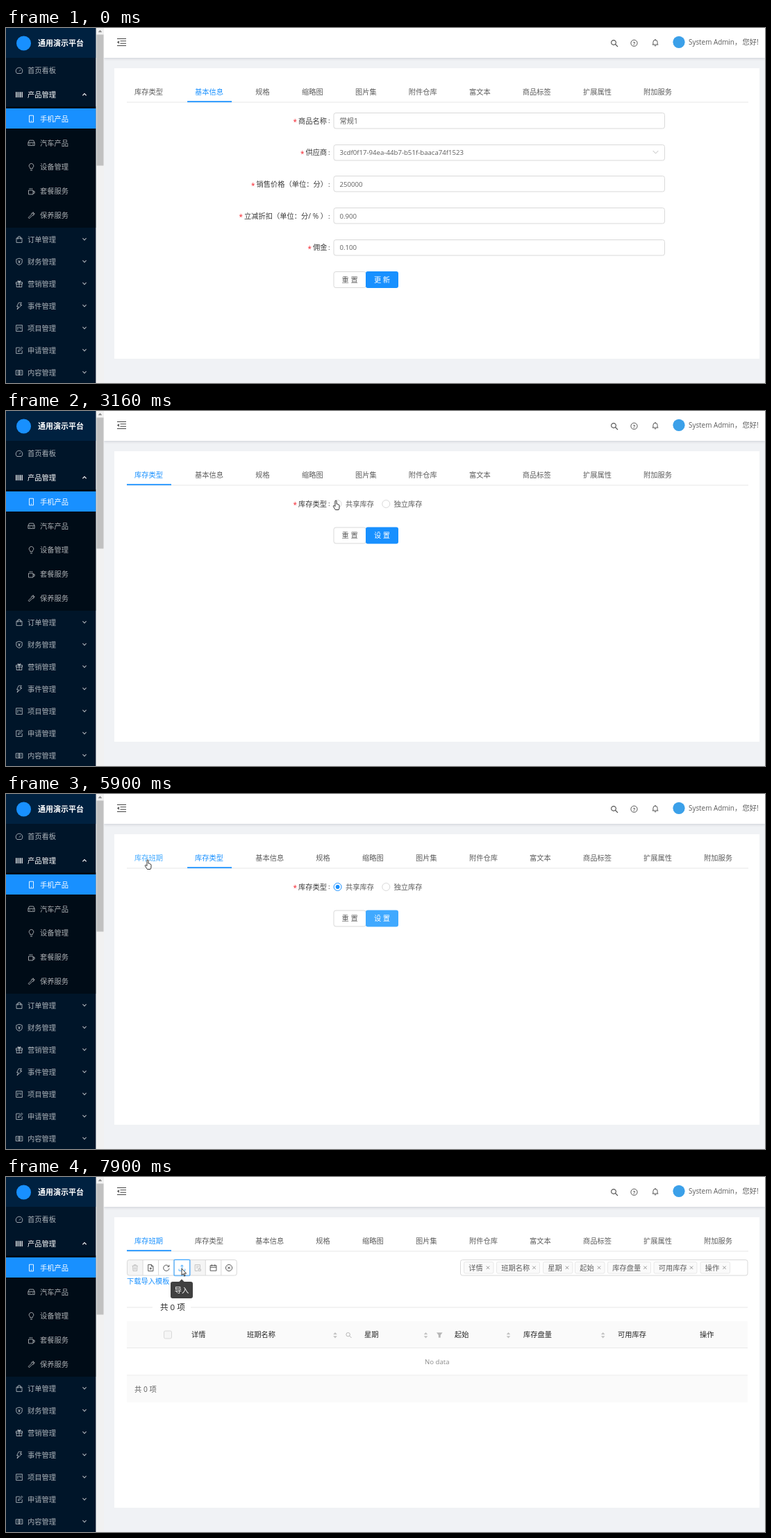
An HTML page with a canvas for the animation above (7.99 s loop, 1093 by 512 pixels).

```html
<!DOCTYPE html>
<html lang="zh-CN">
<head>
<meta charset="utf-8">
<title>Admin tabs</title>
<style>
html, body { margin: 0; width: 100%; height: 100%; overflow: hidden; background: #f0f2f5; }
canvas { display: block; width: 1093px; height: 512px; }
</style>
</head>
<body>
<canvas id="stage"></canvas>
<script>
const W = 1093, H = 512, LOOP = 7990;
const canvas = document.getElementById('stage');
const dpr = window.devicePixelRatio || 1;
canvas.width = W * dpr;
canvas.height = H * dpr;
const c = canvas.getContext('2d');

const BLUE = '#1890ff', HOVER = '#40a9ff', GRAY = '#5c5c5c', DARK = '#262626', LINE = '#d9d9d9', SOFT = '#e8e8e8';
const FONT = '"Open Sans", "Noto Sans CJK SC", "Noto Sans CJK", sans-serif';
const PANE = { x: 174, w: 895 }, TAB = 87.1;

// ---- drawing helpers
function text(s, x, y, color = GRAY, size = 0, weight = 400, align = 'left') {
  const px = size || (/[^\x00-\x7f]/.test(s) ? 10.25 : 9.65);
  c.font = `${weight} ${px}px ${FONT}`;
  c.textAlign = align;
  c.fillStyle = color;
  c.fillText(s, x, y + px * 0.36);
}
function rect(x, y, w, h, color) {
  c.fillStyle = color;
  c.fillRect(x, y, w, h);
}
function box(x, y, w, h, fill, stroke, r = 3) {
  c.beginPath();
  c.roundRect(x, y, w, h, r);
  if (fill) { c.fillStyle = fill; c.fill(); }
  if (stroke) { c.strokeStyle = stroke; c.lineWidth = 1; c.stroke(); }
}
function disc(x, y, r, fill, stroke) {
  c.beginPath();
  c.arc(x, y, r, 0, 7);
  if (fill) { c.fillStyle = fill; c.fill(); }
  if (stroke) { c.strokeStyle = stroke; c.lineWidth = 1; c.stroke(); }
}
function icon(path, x, y, color, width = 0.9, fill) {
  c.save();
  c.translate(x, y);
  const p = new Path2D(path);
  if (fill) { c.fillStyle = fill; c.fill(p); }
  c.strokeStyle = color;
  c.lineWidth = width;
  c.lineJoin = 'round';
  c.stroke(p);
  c.restore();
}

// ---- timing helpers
const clamp = v => Math.max(0, Math.min(1, v));
const inOut = p => p < 0.5 ? 4 * p ** 3 : 1 - 4 * (1 - p) ** 3;
const smooth = p => p * p * (3 - 2 * p);
const part = (t, at, ms) => clamp((t - at) / ms);

// ---- side menu
const RING = 'M-4.6 0A4.6 4.6 0 1 1 4.6 0A4.6 4.6 0 1 1 -4.6 0';
const menu = [
  ['首页看板', 'M-3.2 4A4.8 4.8 0 1 1 3.2 4ZM0 1L2.2 -1.5'],
  ['产品管理', 'M-4.5 -4V4M-2.8 -4V4M-.9 -4V4M1 -4V4M2.6 -4V4M4.5 -4V4'],
];
const subMenu = [
  ['手机产品', 'M-3 -4.8H3V4.8H-3ZM-.6 3H.6'],
  ['汽车产品', 'M-4.6 -.5L-3 -3.8H3L4.6 -.5V3.6H-4.6ZM-4.6 -.5H4.6M-3 1.6H-1.5M1.5 1.6H3'],
  ['设备管理', 'M-1.6 2.4V1A3.3 3.3 0 1 1 1.6 1V2.4ZM-1.4 4.6H1.4'],
  ['套餐服务', 'M-4 -1.5H2.5V4.4H-4ZM2.5 0H4.6V2.6H2.5M-2.5 -4.6V-3M-.8 -4.6V-3M1 -4.6V-3'],
  ['保养服务', 'M-4.4 3L0 -1.2A3 3 0 0 1 3.4 -4.4L1.8 -2.4L2.6 -1.6L4.4 -3.2A3 3 0 0 1 1.2 .2L-3 4.4Z'],
];
const lowMenu = [
  ['订单管理', 'M-4 -2H4V4.4H-4ZM-2 0V-2.8Q-2 -4.6 0 -4.6Q2 -4.6 2 -2.8V0'],
  ['财务管理', 'M0 -4.8L4.2 -3.4V1Q4 3.4 0 4.9Q-4 3.4 -4.2 1V-3.4ZM-1.6 -2L0 0L1.6 -2M0 0V2.6M-1.4 .8H1.4'],
  ['营销管理', 'M-4.5 -2.3H4.5V.2H-4.5ZM-3.8 .2V4.5H3.8V.2M0 -2.3V4.5M0 -2.3Q-3 -3 -2 -4.4Q-.6 -5 0 -2.3Q.6 -5 2 -4.4Q3 -3 0 -2.3'],
  ['事件管理', 'M-.8 -4.8H3.4L1.2 -1.6H4L-3 4.8L-1.2 .8H-3.4Z'],
  ['项目管理', 'M-4.4 -4.4H4.4V4.4H-4.4ZM-2.2 -2.4V2.4M0 -2.4V0M2.2 -2.4V1'],
  ['申请管理', 'M1 -4H-4.3V4.4H4.2V0M-1.5 1.6L-1 -.4L3.6 -4.8L4.8 -3.6L.4 1.1Z'],
  ['内容管理', 'M0 -3.2H-4.8V3.4H0ZM0 -3.2H4.8V3.4H0ZM-3.2 -1H-1.5M-3.2 1H-1.5M1.5 -1H3.2M1.5 1H3.2'],
];

function drawSide() {
  const dim = 'rgba(255,255,255,.67)';
  rect(0, 0, 129.6, H, '#001529');
  rect(0, 0, 129.6, 43, '#002140');
  disc(25.5, 22, 10.5, BLUE);
  text('通用演示平台', 46, 22, '#fff', 11, 700);
  rect(0, 113, 129.6, 175, '#000c17');
  rect(0, 116, 129.6, 29, BLUE);
  menu.forEach(([name, path], i) => {
    const y = 61.5 + 34.7 * i, color = i ? '#fff' : dim;
    icon(path, 19, y, color);
    text(name, 31, y, color);
  });
  icon('M-2.6 1.3L0 -1.3L2.6 1.3', 113, 96, '#fff', 1.2);
  subMenu.forEach(([name, path], i) => {
    const y = 131 + 34.85 * i, color = i ? dim : '#fff';
    icon(path, 36.5, y, color);
    text(name, 49, y, color);
  });
  lowMenu.forEach(([name, path], i) => {
    const y = 305 + 32 * i;
    icon(path, 19, y, dim);
    text(name, 31, y, dim);
    icon('M-2.6 -1.3L0 1.3L2.6 -1.3', 113, y - 0.5, dim, 1.1);
  });
  rect(129.6, 0, 11.4, H, '#f1f1f1');
  rect(130.5, 9.5, 10, 189, '#c1c1c1');
  icon('M-2.5 1.5L0 -1.5L2.5 1.5Z', 135.5, 4.5, '#8a8a8a', 0.3, '#8a8a8a');
}

function drawHeader() {
  c.save();
  c.shadowColor = 'rgba(0,21,41,.16)';
  c.shadowBlur = 4 * dpr;
  c.shadowOffsetY = dpr;
  rect(141, 0, W - 141, 43, '#fff');
  c.restore();
  icon('M-6.5 -5H6.5M-2 -1.7H6.5M-2 1.7H6.5M-6.5 5H6.5', 166.5, 20.5, '#444', 1.1);
  icon('M-6.3 0L-3.8 -2V2Z', 166.5, 20.5, '#444', 0.3, '#444');
  icon('M-4.4 -1A3.4 3.4 0 1 1 2.4 -1A3.4 3.4 0 1 1 -4.4 -1M1.6 1.5L5 5', 876, 22, '#555', 1.1);
  icon(RING, 904.5, 21.8, '#555', 1);
  text('?', 904.5, 21.8, '#444', 7.5, 600, 'center');
  icon('M-4.3 3H4.3M-3.1 3V-.6A3.1 3.1 0 0 1 3.1 -.6V3M0 -5V-3.8M-1.2 4.7H1.2', 935, 21, '#555', 1);
  disc(969, 20.3, 8.6, '#3ba0e9');
  text('System Admin', 983, 20.8, GRAY, 9.9);
  text('，', 1049, 20.8);
  text('您好!', 1060.5, 20.8);
}

// ---- panes
function label(name, x, y) {
  text('*', x - 7.5, y + 1.5, '#f5222d', 10);
  text(name, x, y, '#3a3a3a');
  text(':', 464, y, '#3a3a3a');
}
function buttons(y, main, color) {
  box(472, y, 46.5, 23, '#fff', LINE);
  text('重 置', 495.2, y + 11.7, GRAY, 0, 400, 'center');
  box(518, y - 0.5, 47, 24, color);
  text(main, 541.5, y + 11.7, '#fff', 0, 400, 'center');
}

const fields = [
  ['商品名称', 421, '常规1'],
  ['供应商', 431.5, '3cdf0f17-94ea-44b7-b51f-baaca74f1523'],
  ['销售价格（单位：分）', 360.5, '250000'],
  ['立减折扣（单位：分/ % ）', 343, '0.900'],
  ['佣金', 442, '0.100'],
];
function formPane() {
  fields.forEach(([name, x, value], i) => {
    const y = 134 + 45.7 * i;
    label(name, x, y);
    box(472, Math.round(y - 12) + 0.5, 476.5, 22.5, '#fff', LINE);
    text(value, 480.5, y);
  });
  icon('M-3.8 -2L0 2L3.8 -2', 935.5, 179, '#bfbfbf', 1);
  buttons(351.5, '更 新', BLUE);
}

function radio(x, on) {
  disc(x, 134, 5.5, '#fff', on ? BLUE : LINE);
  if (on) disc(x, 134, 2.9, BLUE);
}
function stockPane(t) {
  label('库存类型', 421, 134);
  radio(477.6, t >= 3240);
  text('共享库存', 489, 134);
  radio(547.3, false);
  text('独立库存', 558.5, 134);
  const wave = part(t, 4260, 480);
  if (wave > 0 && wave < 1) {
    const s = 1 + 2.5 * wave;
    box(518 - s, 167.5 - s, 47 + 2 * s, 24 + 2 * s, `rgba(24,144,255,${0.25 * (1 - wave)})`, null, 4);
  }
  buttons(168, '设 置', t >= 3860 ? HOVER : BLUE);
}

const tools = [
  'M-4.2 -2.8H4.2M-3.2 -2.8L-2.8 4.4H2.8L3.2 -2.8M-1.4 -2.8V-4.4H1.4V-2.8M-1 -1V2.8M1 -1V2.8',
  'M-3.6 -4.6H1.2L3.6 -2.2V4.6H-3.6ZM1 -4.6V-2H3.6M-1.7 1H1.7M0 -.7V2.7',
  'M3.6 -2A4.2 4.2 0 1 0 4.2 .8M4 -4.2V-1.6H1.4',
  'M-4.4 1.6V4.2H4.4V1.6M0 2V-4M-2 -2L0 -4.2L2 -2',
  'M3.4 0V-4.4H-3.8V4.4H0M-2 -2H1.8M-2 0H.6M1 2H4.4V4.4H1ZM1.8 2V.8H3.6V2',
  'M-4.4 -3.4H4.4V4.2H-4.4ZM-4.4 -.8H4.4M-2.2 -4.8V-2.4M2.2 -4.8V-2.4',
  RING + 'M-1.7 -1.7L1.7 1.7M1.7 -1.7L-1.7 1.7',
];
const tags = [
  [659, '详情'], [706, '班期名称'], [773, '星期'], [819, '起始'],
  [866, '库存盘量'], [932.5, '可用库存'], [999.5, '操作'],
];
const columns = [
  [267, '详情'], [347, '班期名称', 474], [516, '星期', 604.5], [646, '起始', 723.5],
  [745, '库存盘量', 859.7], [881, '可用库存'], [999, '操作'],
];

function tablePane(t) {
  const step = 22.55, hover = t >= 7460;
  tools.forEach((path, i) => {
    const off = i === 0 || i === 4, x = 174.5 + step * i;
    rect(x, 120, step, 22, off ? '#f5f5f5' : '#fff');
    icon(path, x + step / 2, 131, off ? '#bbb' : i === 3 && hover ? HOVER : '#444', 0.9);
    if (i) rect(x - 0.5, 120, 1, 22, LINE);
  });
  box(174.5, 119.5, 157.8, 22.5, null, LINE);
  if (hover) {
    const x = 174.5 + step * 3;
    if (t >= 7800) {
      c.globalAlpha *= 0.25;
      box(x - 1, 118.5, step + 2, 24.5, null, BLUE);
      c.globalAlpha *= 4;
    }
    box(x, 119.5, step, 22.5, null, HOVER, 0);
  }
  text('下载导入模板', 174, 150.5, BLUE);

  box(654.5, 119.5, 413.5, 22.5, '#fff', LINE);
  tags.forEach(([x, name]) => {
    const w = name.length === 4 ? 63 : 43.5;
    box(x + 0.5, 122.5, w - 1, 16.5, '#fafafa', SOFT, 2);
    text(name, x + 7.3, 131);
    icon('M-2.2 -2.2L2.2 2.2M2.2 -2.2L-2.2 2.2', x + w - 8.5, 130.7, '#8c8c8c');
  });

  rect(174, 187.5, 37, 1, SOFT);
  rect(266, 187.5, 802, 1, SOFT);
  text('共 0 项', 222, 188, DARK, 11.6);

  rect(174, 208, 894, 38, '#fafafa');
  rect(174, 246, 894, 1, SOFT);
  box(227.5, 222, 11, 11, '#f5f5f5', LINE, 2);
  columns.forEach(([x, name, sort]) => {
    text(name, x, 227.5, DARK);
    if (sort) {
      icon('M-2.5 -1.3L0 -4L2.5 -1.3ZM-2.5 1.3L0 4L2.5 1.3Z', sort, 228.3, '#bfbfbf', 0.3, '#bfbfbf');
    }
  });
  icon('M-3.6 -.8A2.7 2.7 0 1 1 1.8 -.8A2.7 2.7 0 1 1 -3.6 -.8M1 1L4 4', 493.5, 228, '#b5b5b5', 1);
  icon('M-4 -3.5H4L1.3 0V3.5H-1.3V0Z', 624.3, 228, '#b5b5b5', 0.3, '#b5b5b5');
  text('No data', 620.7, 266.5, '#8c8c8c', 0, 400, 'center');
  rect(174, 285.5, 894, 1, SOFT);
  rect(174, 286.5, 894, 38.5, '#fafafa');
  text('共 0 项', 185, 306.5);
}

function tooltip(alpha) {
  c.globalAlpha = alpha;
  box(237, 151, 32, 24, '#404040');
  icon('M-4 3.5L0 -.5L4 3.5Z', 253, 148, '#404040', 0.2, '#404040');
  text('导入', 253, 163.2, '#fff', 0, 400, 'center');
  c.globalAlpha = 1;
}

// ---- tabs and pane slides
const baseTabs = ['库存类型', '基本信息', '规格', '缩略图', '图片集', '附件仓库', '富文本', '商品标签', '扩展属性', '附加服务'];
const moreTabs = ['库存班期', ...baseTabs];
const slides = [
  { at: -1000, from: 1, to: 1, tabs: baseTabs, pane: formPane },
  { at: 1843, from: 1, to: 0, tabs: baseTabs, pane: stockPane, old: formPane },
  { at: 4400, from: 0, to: 1, tabs: moreTabs, pane: stockPane },
  { at: 6250, from: 1, to: 0, tabs: moreTabs, pane: tablePane, old: stockPane },
];

function drawPane(pane, t, dx, alpha) {
  if (alpha <= 0) return;
  c.save();
  c.beginPath();
  c.rect(PANE.x - 1, 108, PANE.w + 1, 368);
  c.clip();
  c.translate(dx, 0);
  c.globalAlpha = alpha;
  pane(t);
  c.restore();
}

function drawCard(t, pointer) {
  rect(156, 58, 929, 419, '#fff');
  const s = slides.filter(v => v.at <= t).pop();
  const p = inOut(part(t, s.at, 300)), dir = s.to - s.from;
  const fade = s.old ? 1 - (1 - part(t, s.at, 450)) ** 2 : 1;
  const dx = dir * (1 - p) * PANE.w;
  const overFirst = pointer && pointer.y < 107 && pointer.x < 238;
  let x = 185;
  s.tabs.forEach((name, i) => {
    const color = i === 0 && overFirst ? HOVER : i === s.to ? BLUE : GRAY;
    text(name, x, 92, color);
    x += 46.45 + 10.16 * name.length;
  });
  rect(PANE.x, 106.5, PANE.w, 1, SOFT);
  rect(PANE.x + TAB * (s.from + dir * p), 105.3, 64, 1.8, BLUE);
  if (s.old) drawPane(s.old, t, dx - dir * PANE.w, 1 - fade);
  drawPane(s.pane, t, dx, fade);
}

// ---- pointer
const route = [
  [380, 1011, 503], [1160, 305, 181], [1230, 305, 181], [1760, 207, 97],
  [2310, 207, 97], [3000, 475, 129], [3400, 475, 129], [3880, 544, 176],
  [5270, 544, 176], [5850, 204, 95], [6200, 204, 95], [6670, 201, 102],
  [6980, 201, 102], [7480, 253, 132], [LOOP, 253, 132],
];
function pointerAt(t) {
  if (t < route[0][0]) return null;
  const i = route.findIndex(k => k[0] > t);
  const [t0, x0, y0] = route[i - 1], [t1, x1, y1] = route[i];
  const p = smooth((t - t0) / (t1 - t0));
  return { x: x0 + (x1 - x0) * p, y: y0 + (y1 - y0) * p };
}
function drawPointer({ x, y }, t) {
  const onTab = y < 107 && x < 238;
  const onRadio = t > 2500 && t < 3800 && x > 470 && y < 141;
  const onButton = t > 3500 && t < 5900 && x > 518 && x < 565 && y > 168 && y < 192;
  if (onTab || onRadio || onButton) {
    icon('M-1 8.6V1Q-1 0 0 0Q1.1 0 1.1 1V5.2Q2.4 4.6 3 5.8Q4.6 5.6 5 7.2V10Q5 12 4 13.5H-.6Q-2 11.4 -3.6 8.8Q-4 7.4 -2.7 7.4Z',
      x, y, '#222', 0.9, '#fff');
  } else {
    icon('M0 0V9.6L2.2 7.6L3.7 11L5.1 10.4L3.6 7.1H6.6Z', x, y, '#222', 0.9, '#fff');
  }
}

function draw(t) {
  c.setTransform(dpr, 0, 0, dpr, 0, 0);
  rect(0, 0, W, H, '#f0f2f5');
  const pointer = pointerAt(t);
  drawCard(t, pointer);
  drawHeader();
  drawSide();
  if (t > 7580) tooltip(part(t, 7580, 90));
  if (pointer) drawPointer(pointer, t);
}

let start;
function tick(now) {
  start ??= now;
  draw((now - start) % LOOP);
  requestAnimationFrame(tick);
}
draw(0);
requestAnimationFrame(tick);
</script>
</body>
</html>
```
